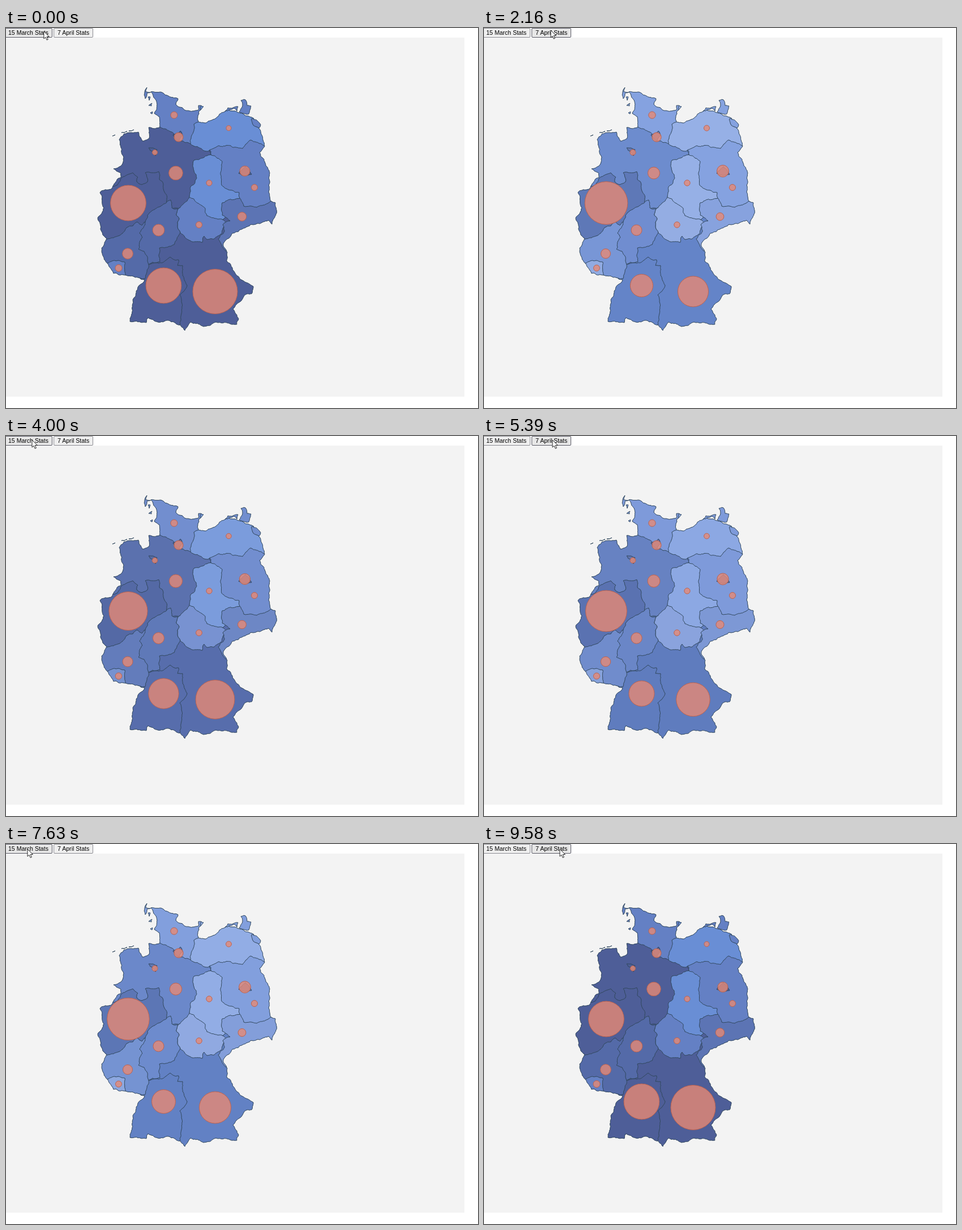
Recreate the animation shown at these times as an HTML page. Size 834x672 px, loop 9650 ms.

```html
<!DOCTYPE html>
<html lang="en">
<head>
<meta charset="utf-8">
<title>Regional stats map</title>
<style>
  html, body { margin: 0; width: 100%; height: 100%; overflow: hidden; background: #fff; }
  svg { display: block; width: 834px; height: 672px; }
  text { font: 10.55px "Liberation Sans", Arial, sans-serif; fill: #000; }
  #land path, #isles path, #outline { stroke: #30475c; stroke-width: 1; stroke-linejoin: round; }
  #bubbles circle { fill: rgb(230,137,117); fill-opacity: .8; stroke: #bd6350; }
</style>
</head>
<body>
<svg viewBox="0 0 834 672">
  <clipPath id="clip"><path id="shape"/></clipPath>
  <rect y="17" width="810" height="635" fill="#f3f3f3"/>
  <g id="land" clip-path="url(#clip)"></g>
  <path id="outline" fill="none"/>
  <g id="isles"></g>
  <g id="bubbles"></g>
  <rect class="button" x="-1.5" y=".5" width="83" height="16" rx="1.5"/>
  <text x="4" y="12">15 March Stats</text>
  <rect class="button" x="84.5" y=".5" width="69" height="16" rx="1.5"/>
  <text x="91" y="12">7 April Stats</text>
  <path id="cursor" d="M0 0V13L3 10.3 5.2 15.2 7.4 14.2 5.2 9.5H9.4Z" fill="#fff" stroke="#111" stroke-width=".9"/>
</svg>
<script>
const LOOP = 9650, FADE = 500;
const $ = id => document.getElementById(id);
const mix = (a, b, k) => a + (b - a) * k;
const cubicInOut = k => k < .5 ? 4 * k ** 3 : 1 - 4 * (1 - k) ** 3;
const areas = [], circles = [];

function add(parent, tag, attrs) {
  const el = document.createElementNS('http://www.w3.org/2000/svg', tag);
  for (const key in attrs) el.setAttribute(key, attrs[key]);
  return parent.appendChild(el);
}

function noise(x, y) {
  const n = Math.sin(x * 12.9898 + y * 78.233) * 43758.5453;
  return n - Math.floor(n) - .5;
}

// Midpoint displacement; the same in both directions, so neighbours fit.
function roughen(a, b) {
  const length = Math.hypot(b[0] - a[0], b[1] - a[1]);
  if (length < 3.5) return [b];
  const sx = a[0] + b[0], sy = a[1] + b[1], size = Math.min(5, length * .26);
  const middle = [sx / 2 + noise(sx, sy) * size, sy / 2 + noise(sy, sx) * size];
  return [...roughen(a, middle), ...roughen(middle, b)];
}

function ragged(text) {
  const points = text.split(' ').map(pair => pair.split(',').map(Number));
  const line = points.flatMap((p, i) => roughen(p, points[(i + 1) % points.length]));
  return 'M' + line.map(p => p.map(v => v.toFixed(1)).join()).join('L') + 'Z';
}

function paint(parent, april, march, text) {
  areas.push({ april, march, el: add($(parent), 'path', { d: ragged(text) }) });
}

// Regions overlap: a later one owns the shared border, the country outline clips the rest.
const region = (april, march, text) => paint('land', april, march, text);
const isle = text => paint('isles', '#6480c4', '#8eabe7', text);

function bubble(cx, cy, april, march) {
  circles.push({ april, march, el: add($('bubbles'), 'circle', { cx, cy }) });
}

const coast = '203,257 190,249 203,244 208,229 200,197 209,187 234,184 241,200 252,196 252,176 272,175 271,157 262,151 267,135 256,113 279,116 304,125 300,135 322,146 341,144 340,137 349,139 341,147 340,166 352,168 375,156 391,145 409,149 438,160 435,168 449,180 457,209';
const frontier = '448,220 466,256 464,290 468,306 476,309 478,322 470,347 464,340 443,346 400,363 384,381 391,397 390,412 408,438 437,457 434,470 421,473 401,497 411,514 408,524 371,520 349,528 326,520 316,535 308,525 285,517 268,520 251,512 248,521 219,519 230,465 245,445 211,437 190,434 179,416 169,389 178,372 167,356 162,336 173,318 166,291 186,285 203,264';
for (const id of ['shape', 'outline']) $(id).setAttribute('d', ragged(coast + ' ' + frontier));

// Bavaria fills the land first
region('#4e5e98', '#6a8ed5', '150,95 490,95 490,545 150,545');
bubble(369.5, 466, 39.5, 23.7);

// Lower Saxony
region('#4e5e98', '#7698dd', '150,160 330,160 362,222 330,310 305,319 293,319 150,300');
bubble(300, 256.5, 12.3, 10);

// Brandenburg
region('#6480c4', '#8eabe7', '358,195 500,195 500,330 372,330');
bubble(439, 282, 5.5, 5.5);

// Rhineland-Palatinate
region('#546aa8', '#82a2e2', '150,340 245,340 255,418 255,450 150,450');
bubble(215, 399, 9.4, 8.2);

// Schleswig-Holstein
region('#6480c4', '#8eabe7', '230,95 360,95 360,165 326,205 306,199 293,184 272,175 230,160');
bubble(297, 154, 6, 6.2);

// Mecklenburg-Vorpommern
region('#698ed5', '#a2b9eb', '352,120 480,120 480,215 457,209 447,204 432,198 418,213 397,208 376,208 357,218 326,205 331,184 332,170 340,166');
bubble(393.5, 177, 4.5, 5.1);

// North Rhine-Westphalia
region('#4e5e98', '#627fc0', '150,285 192,280 204,265 224,256 233,264 231,272 240,277 250,272 246,256 270,254 271,268 277,273 284,302 284,310 250,340 240,349 232,343 213,353 206,363 190,371 150,375');
bubble(216, 309.5, 31.4, 39.6);

// Hesse
region('#546aa8', '#7797db', '291,304 293,318 304,320 301,331 306,337 303,344 308,362 291,386 271,389 272,413 259,414 252,418 244,395 234,391 241,370 236,363 246,343 258,323 272,316 284,308');
bubble(269.5, 357.5, 10.4, 9.2);

// Thuringia
region('#6480c4', '#a1b9ec', '324,299 350,310 383,339 390,347 377,367 355,374 350,368 347,379 329,378 308,362 303,344 306,337 301,331 304,320');
bubble(341, 348, 5.5, 5.1);

// Saxony-Anhalt
region('#698ed5', '#a2b9eb', '362,224 382,236 379,256 381,278 412,291 413,301 400,320 383,339 355,332 352,319 324,299 326,281 337,265 330,243 332,234');
bubble(359, 274, 5, 5.2);

// Saxony
region('#5c74b4', '#92aee9', '382,309 413,301 420,315 443,317 468,306 500,306 500,370 390,395 375,373 386,360 383,348 396,341 382,331');
bubble(417, 333.5, 7.8, 6.6);

// Baden-Wuerttemberg
region('#4e5e98', '#6a8ed5', '200,450 246,443 252,418 282,411 290,405 305,410 303,420 312,420 312,437 320,455 307,472 310,505 300,545 200,545');
bubble(278.5, 455.5, 31.4, 17);

// Saarland
region('#6480c4', '#9db7ea', '179,416 198,411 210,414 211,437 200,450 170,445');
bubble(199, 424.5, 6, 5.3);

// Hamburg, Bremen, Berlin
region('#4c5e96', '#6c82be', '295,189 308,182 312,190 305,200');
bubble(305, 193, 8, 8.2);
region('#4c5e96', '#6c82be', '252,212 267,215 264,226');
bubble(263, 220, 4.5, 5.2);
region('#4c5e96', '#6c82be', '411,257 423,245 434,259 422,261');
bubble(422, 253, 9, 10.9);

isle('249,105 247,113 257,113 249,116 246,125 245,113');
isle('251,122 255,122 253,128');
isle('252,137 258,133 257,138');
isle('255,150 259,148 258,152');
isle('415,128 423,127 426,137 433,138 429,152 412,148 418,137');
isle('387,147 392,141 410,139 408,147 403,142');
isle('434,160 450,171 447,177 437,172');
isle('188,191 193,189');
isle('204,185 214,183');
isle('217,182 226,180');

// [time, level]: the level eases to 1 for 15 March, to 0 for 7 April
const clicks = [[500, 1], [1973, 0], [3785, 1], [5162, 0], [7336, 1], [9075, 0]];

// [time, x, y] of the pointer tip
const pointer = [
  [0, 67, 6], [300, 50, 5], [1200, 50, 5], [1500, 105, 6], [1780, 118, 4], [2560, 118, 4],
  [3470, 46, 7], [4450, 46, 7], [4780, 114, 7], [4930, 121, 7], [5780, 121, 7],
  [6180, 72, 7], [6710, 38, 9], [7850, 38, 9], [8260, 108, 18], [8650, 134, 9], [LOOP, 134, 9]
];

const buttons = [...document.querySelectorAll('.button')];

function levelAt(t) {
  const last = clicks.filter(([time]) => time <= t).pop();
  if (!last) return 0;
  const [time, target] = last;
  return mix(1 - target, target, cubicInOut(Math.min(1, (t - time) / FADE)));
}

function pointerAt(t) {
  const i = pointer.findIndex(([time]) => time > t);
  const [t0, x0, y0] = pointer[i - 1], [t1, x1, y1] = pointer[i];
  const k = (t - t0) / (t1 - t0);
  return [mix(x0, x1, k), mix(y0, y1, k)];
}

function draw(now) {
  const t = Math.max(0, now) % LOOP, level = levelAt(t), [x, y] = pointerAt(t);
  for (const { el, april, march } of areas)
    el.style.fill = `color-mix(in srgb, ${march} ${(level * 100).toFixed(2)}%, ${april})`;
  for (const { el, april, march } of circles) el.setAttribute('r', mix(april, march, level));

  const pressed = clicks.some(([time]) => t >= time - 100 && t < time);
  buttons.forEach((el, i) => {
    const over = y < 17 && (i ? x > 84 && x < 154 : x < 82);
    el.setAttribute('fill', over ? (pressed ? '#f5f5f5' : '#e7e7e7') : '#efefef');
    el.setAttribute('stroke', over && !pressed ? '#5a5a66' : '#8c8c92');
  });
  $('cursor').setAttribute('transform', `translate(${x.toFixed(1)} ${y.toFixed(1)})`);
  requestAnimationFrame(draw);
}
requestAnimationFrame(draw);
</script>
</body>
</html>
```
